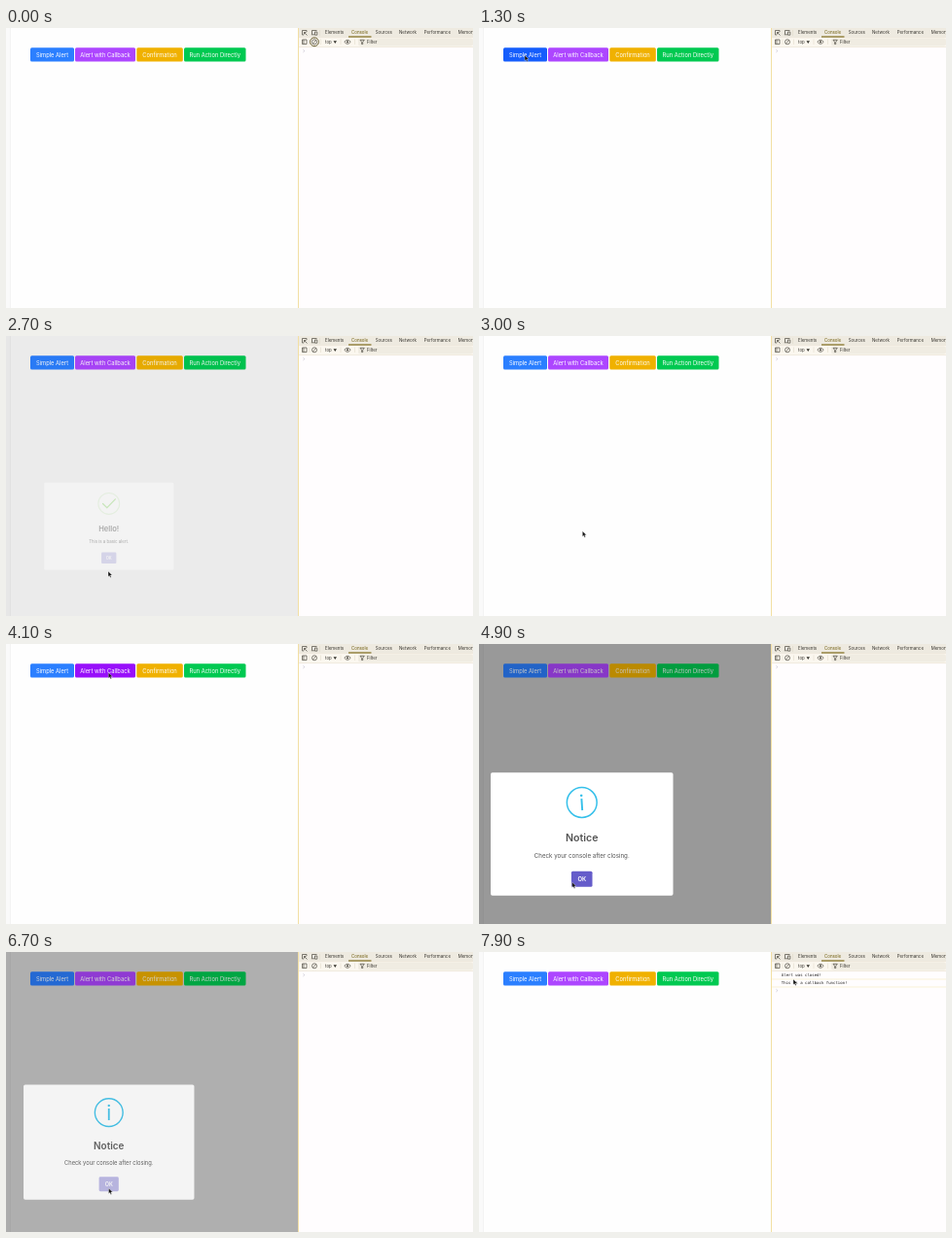
Write an HTML page that moves like this. It is 480x288 px and loops after 8 s.

```html
<!DOCTYPE html>
<html lang="en">
<head>
<meta charset="utf-8">
<title>Alert demo</title>
<style>
  html, body { margin: 0; height: 100%; overflow: hidden; background: #fefefe; }
  svg { display: block; width: 100vw; height: 100vh; }
  text { font-family: Inter, sans-serif; white-space: pre; }
  #buttons text { font-size: 5.8px; fill: #fff; text-anchor: middle; }
  #popup text { text-anchor: middle; fill: #545454; }
  #popup .title { font-size: 10.6px; font-weight: 600; }
  #popup .body { font-size: 6.2px; }
  #tools text { font-size: 4.45px; fill: #35332d; }
  #logs text { font: 4.03px "DejaVu Sans Mono", monospace; fill: #222; }
  .line { fill: none; stroke: #4a473e; stroke-width: .7; }
</style>
</head>
<body>
<svg viewBox="0 0 480 288">
  <rect width="480" height="288" fill="#fefefe"/>
  <rect width="4.5" height="288" fill="#fafafa"/>
  <path d="M4.5 0V288" stroke="#ececec" stroke-width=".6"/>
  <rect id="shade" width="300" height="288"/>
  <g id="buttons"></g>

  <g id="popup">
    <rect x="12" y="132.3" width="187.5" height="126.5" rx="1.8" fill="#fff"/>
    <g id="success" fill="none" stroke="#98de78" stroke-width="1.5">
      <circle cx="105.75" cy="163" r="15.4" opacity=".35"/>
      <circle id="arc" cx="105.75" cy="163" r="15.4" pathLength="360" stroke-dasharray="165 195"/>
      <path id="check" d="M97 163L103 169L115 156.5" pathLength="1" stroke-dasharray="1 2"
        stroke-width="1.8" stroke-linecap="round"/>
    </g>
    <g id="info">
      <circle cx="105.75" cy="163" r="15.4" fill="none" stroke="#36c0ea" stroke-width="1.5"/>
      <text id="mark" x="105.75" y="171" font-size="22" style="fill:#36c0ea">i</text>
    </g>
    <text class="title" id="title" x="105.75" y="203.3"></text>
    <text class="body" id="body" x="105.75" y="220.4"></text>
    <g id="ok">
      <rect id="okBox" x="94.9" y="233.7" width="21.6" height="16" rx="1.5"/>
      <text x="105.75" y="243.8" font-size="5.9" font-weight="600" style="fill:#fff">OK</text>
    </g>
  </g>

  <g id="tools">
    <rect x="300" width="180" height="288" fill="#fffdfe"/>
    <rect x="300" width="180" height="9.6" fill="#eeeae0"/>
    <rect x="300" y="9.6" width="180" height="10" fill="#fbf7ef"/>
    <rect x="362" y="10.6" width="118" height="8" rx="2" fill="#f0ece2"/>
    <path d="M301 9.6H480M301 19.6H480" stroke="#e2dbc8" stroke-width=".5"/>
    <path d="M300.5 0V288" stroke="#f2dfa4"/>
    <path d="M352 9H375.5" stroke="#75610a" stroke-width="1.1"/>
    <path d="M322.5 2V8M312 11.5V17M323.5 11.5V17M344 11.5V17M358.5 11.5V17" stroke="#ddd6c4" stroke-width=".5"/>
    <g id="tabs"></g>
    <g class="line">
      <path d="M306 7H304.5V2.5H309V4M306.5 4.5L309.5 7.5M306.5 6.5V4.5H308.5"/>
      <path d="M314.5 6.5V2.5H319.5M313.8 6.8H317M317.5 4H319.8V7.2H317.5Z"/>
      <path d="M304.5 12H309V16.6H304.5ZM306 12V16.6"/>
      <circle cx="317" cy="14.3" r="2.5"/>
      <path d="M315.3 16L318.8 12.6"/>
      <path d="M347.8 14.3Q351 10.3 354.2 14.3Q351 18.3 347.8 14.3Z"/>
      <path d="M364 12.3H368.3L366.7 14.4V16.6H365.6V14.4Z"/>
    </g>
    <circle cx="351" cy="14.3" r="1" fill="#4a473e"/>
    <path d="M336.5 13.2H340L338.25 16Z" fill="#35332d"/>
    <text x="328" y="15.9">top</text>
    <text x="371" y="15.9">Filter</text>
    <circle id="focus" cx="317" cy="14.3" r="4.4" fill="none" stroke="#655b2e" stroke-width="1"/>
  </g>
  <g id="logs">
    <text x="310.8" y="25.4">Alert was closed!</text>
    <text x="310.8" y="33.1">This is a callback function!</text>
    <path d="M301 28H480M301 36H480" stroke="#f7ecc4" stroke-width=".7"/>
  </g>
  <path id="prompt" d="M305.4 22.2L306.9 23.6L305.4 25" fill="none" stroke="#b9b4c4" stroke-width=".6"/>
  <path id="cursor" d="M0 0V5.6L1.3 4.5L2.2 6.5L3.2 6L2.3 4.1H4.1Z" fill="#111" stroke="#fff" stroke-width=".35"/>
</svg>
<script>
const LOOP = 8000, STEP = 100;
const $ = id => document.getElementById(id);
const set = (id, attrs) => Object.entries(attrs).forEach(([k, v]) => $(id).setAttribute(k, v));
const show = (id, on) => set(id, { visibility: on ? 'inherit' : 'hidden' });
const clamp = v => Math.min(1, Math.max(0, v));
const smooth = v => v * v * (3 - 2 * v);

// Linear interpolation through [time, ...values] rows
function track(rows, t) {
  if (t <= rows[0][0]) return rows[0].slice(1);
  const i = rows.findIndex(r => r[0] > t);
  if (i < 0) return rows[rows.length - 1].slice(1);
  const [a, b] = [rows[i - 1], rows[i]], p = (t - a[0]) / (b[0] - a[0]);
  return a.slice(1).map((v, k) => v + (b[k + 1] - v) * p);
}

const buttons = [
  { label: 'Simple Alert', x: 25, w: 45, fill: '#2b7fff', hover: '#155dfc' },
  { label: 'Alert with Callback', x: 71, w: 62, fill: '#ad46ff', hover: '#9810fa' },
  { label: 'Confirmation', x: 134.3, w: 47.5, fill: '#f0b100', hover: '#d08700' },
  { label: 'Run Action Directly', x: 183, w: 63.5, fill: '#00c951', hover: '#00a63e' }
];
$('buttons').innerHTML = buttons.map(b => `
  <rect x="${b.x}" y="20.2" width="${b.w}" height="14.4" rx="1.5"/>
  <text x="${b.x + b.w / 2}" y="29.6">${b.label}</text>`).join('');
const faces = $('buttons').querySelectorAll('rect');

const tabs = { Elements: 328, Console: 355, Sources: 379.7, Network: 404, Performance: 429.8, Memory: 464.7 };
$('tabs').innerHTML = Object.entries(tabs).map(([name, x]) =>
  `<text x="${x}" y="6.4"${name === 'Console' ? ' style="fill:#6b5908"' : ''}>${name}</text>`).join('');

const alerts = [
  { kind: 'success', title: 'Hello!', body: 'This is a basic alert.', open: 1350, close: 2591 },
  { kind: 'info', title: 'Notice', body: 'Check your console after closing.', open: 4250, close: 6655 }
];
const pointer = [
  [200, 465, 183], [500, 240, 100], [800, 70, 42], [1000, 47, 28], [1350, 47, 28],
  [1700, 75.7, 124.5], [1900, 103, 232], [2000, 105, 242], [2800, 105, 242],
  [3100, 107, 180], [3500, 108, 50], [3800, 106, 32], [4000, 105.3, 29.5], [4250, 105.3, 29.5],
  [4600, 98, 160], [4900, 95.7, 245], [5100, 96, 246], [5300, 102.2, 243.5], [5400, 102.2, 243.5],
  [5700, 104.5, 242.7], [5900, 105.5, 243], [6800, 105.5, 243],
  [7100, 190, 170], [7400, 318, 50], [7500, 330, 36], [7700, 325, 30], [7800, 323, 28]
];
const popScale = [[0, .7], [135, 1.05], [240, .95], [300, 1]];
const markSwing = [[0, 45, 0], [200, -25, .4], [400, 15, .8], [600, -5, 1], [800, 0, 1]];

function drawIcon(kind, age) {
  show('success', kind === 'success');
  show('info', kind === 'info');
  const spin = (age - 212) / 298;
  show('arc', kind === 'success' && spin > 0 && spin < 1);
  set('arc', { transform: `rotate(${66 - 360 * spin} 105.75 163)` });
  const drawn = clamp((age - 405) / 345);
  show('check', kind === 'success' && drawn > 0);
  set('check', { 'stroke-dashoffset': 1 - drawn });
  const flip = clamp(age / 500), [angle, alpha] = track(markSwing, age);
  set('info', {
    opacity: flip,
    transform: `translate(0 163) scale(1 ${Math.cos((1 - flip) * Math.PI / 2)}) translate(0 -163)`
  });
  set('mark', { opacity: alpha, transform: `rotate(${angle} 105.75 163)` });
}

function draw(t) {
  const [x, y] = track(pointer, t);
  const over = (bx, by, w, h) => x >= bx && x <= bx + w && y >= by && y <= by + h;
  show('cursor', t >= 200);
  set('cursor', { transform: `translate(${x} ${y})` });

  const alert = alerts.find(a => t >= a.open && t < a.close + 150);
  let shade = 0;
  show('popup', alert);
  if (alert) {
    const age = t - alert.open, out = clamp((t - alert.close) / 150), gone = out ** 1.7;
    shade = .4 * clamp(age / 100) * (1 - smooth(out));
    const scale = track(popScale, age)[0] * (1 - gone / 2);
    set('popup', {
      opacity: 1 - gone,
      transform: `translate(105.75 195.5) scale(${scale}) translate(-105.75 -195.5)`
    });
    $('title').textContent = alert.title;
    $('body').textContent = alert.body;
    set('ok', { opacity: out ? .45 : 1 });
    set('okBox', { fill: over(95, 234, 21, 16) ? '#655cca' : '#7066e0' });
    drawIcon(alert.kind, age);
  }
  set('shade', { opacity: shade });
  $('buttons').style.filter = `brightness(${1 - shade * .55})`;
  buttons.forEach((b, i) =>
    faces[i].setAttribute('fill', !alert && over(b.x, 20, b.w, 15) ? b.hover : b.fill));

  const logged = t >= 6900;
  show('focus', t < 1300);
  show('logs', logged);
  set('prompt', { transform: `translate(0 ${logged ? 16 : 0})` });
}

function tick(now) {
  draw(Math.floor(now % LOOP / STEP) * STEP);
  requestAnimationFrame(tick);
}
requestAnimationFrame(tick);
</script>
</body>
</html>
```
